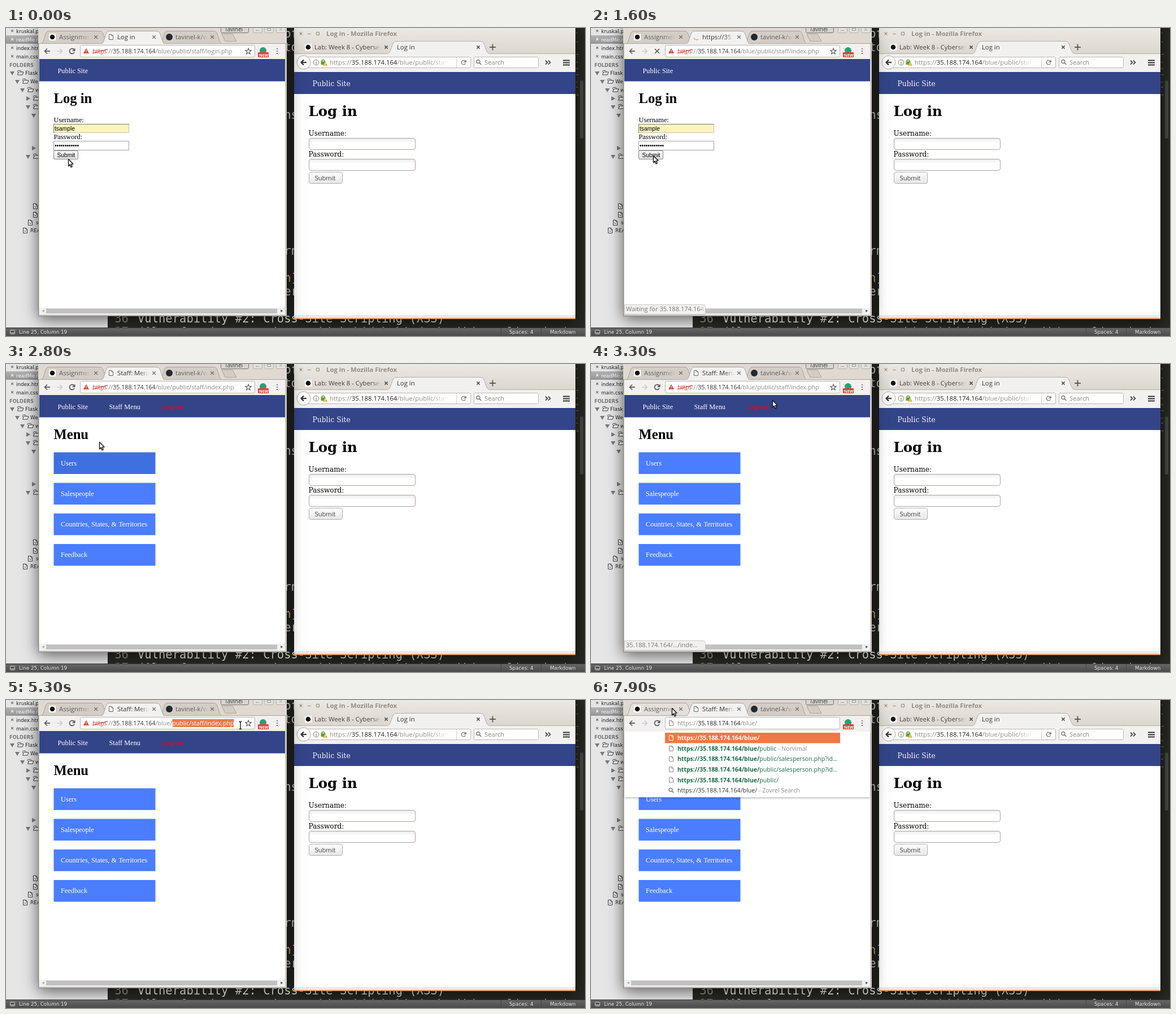
An HTML page with a canvas that plays this animation: 1025x546 px, repeating every 8000 ms.

```html
<!DOCTYPE html>
<html lang="en">
<head>
<meta charset="utf-8">
<title>Two browser sessions</title>
<style>
html, body { margin: 0; width: 100%; height: 100%; overflow: hidden; background: #272822; }
canvas { display: block; }
</style>
</head>
<body>
<canvas id="stage" width="1025" height="546"></canvas>
<script>
const ctx = document.getElementById('stage').getContext('2d');
const LOOP = 8000, STEP = 100;

const UI = '"Open Sans", sans-serif';
const SANS = '"DejaVu Sans", sans-serif';
const MONO = '"DejaVu Sans Mono", monospace';
const SERIF = '"Liberation Serif", serif';
const WIDE = '"DejaVu Serif", serif';
const ARIAL = '"Liberation Sans", sans-serif';

const NAVY = '#334488', CHROME = '#f2f1f0', ORANGE = '#f07746';
const HOST = '35.188.174.164';
const URL_SIZE = 10.65;

// Cursor keyframes: time, x, y
const PATH = [
  [0, 110, 232], [100, 112, 228], [200, 117, 218], [500, 117, 218], [600, 113, 222], [700, 110, 226],
  [2300, 110, 226], [2400, 138, 207], [2500, 150, 188], [2600, 155, 165], [2700, 155, 165],
  [2800, 165, 138], [3000, 215, 82], [3200, 292, 72], [3300, 321, 64], [3400, 335, 56], [3600, 322, 49],
  [4200, 295, 44], [4600, 295, 44], [5300, 415, 45], [7000, 415, 45], [7400, 336, 48], [7900, 143, 14]
];

const MENU = ['Users', 'Salespeople', 'Countries, States, & Territories', 'Feedback'];

function cursorAt(t) {
  let i = PATH.length - 1;
  while (i > 0 && PATH[i][0] > t) i--;
  const [t0, x0, y0] = PATH[i];
  const [t1, x1, y1] = PATH[i + 1] || [LOOP, x0, y0];
  const k = Math.max(0, (t - t0) / (t1 - t0));
  return { x: x0 + (x1 - x0) * k, y: y0 + (y1 - y0) * k };
}

const inside = (p, x, y, w, h) => p.x >= x && p.x < x + w && p.y >= y && p.y < y + h;

function rect(x, y, w, h, fill) {
  ctx.fillStyle = fill;
  ctx.fillRect(x, y, w, h);
}

function box(x, y, w, h, r, fill, stroke) {
  ctx.beginPath();
  ctx.roundRect(x, y, w, h, r);
  if (fill) { ctx.fillStyle = fill; ctx.fill(); }
  if (stroke) { ctx.strokeStyle = stroke; ctx.lineWidth = 1; ctx.stroke(); }
}

function poly(points, fill, stroke, width = 1, close = true) {
  ctx.beginPath();
  points.forEach(([x, y], i) => i ? ctx.lineTo(x, y) : ctx.moveTo(x, y));
  if (close) ctx.closePath();
  if (fill) { ctx.fillStyle = fill; ctx.fill(); }
  if (stroke) { ctx.strokeStyle = stroke; ctx.lineWidth = width; ctx.stroke(); }
}

const line = (points, color, width = 1) => poly(points, null, color, width, false);

function disc(x, y, r, fill, stroke, width = 1) {
  ctx.beginPath();
  ctx.arc(x, y, r, 0, 7);
  if (fill) { ctx.fillStyle = fill; ctx.fill(); }
  if (stroke) { ctx.strokeStyle = stroke; ctx.lineWidth = width; ctx.stroke(); }
}

function arc(x, y, r, from, to, color, width) {
  ctx.beginPath();
  ctx.arc(x, y, r, from, to);
  ctx.strokeStyle = color;
  ctx.lineWidth = width;
  ctx.stroke();
}

function vertical(y0, y1, top, bottom) {
  const g = ctx.createLinearGradient(0, y0, 0, y1);
  g.addColorStop(0, top);
  g.addColorStop(1, bottom);
  return g;
}

// Returns the x position after the text
function text(s, x, y, size, family, color, weight = '') {
  ctx.font = `${weight} ${size}px ${family}`;
  ctx.fillStyle = color;
  ctx.fillText(s, x, y);
  return x + ctx.measureText(s).width;
}

// Text that dissolves towards its right end
function fading(s, x, y, size, color, end, span = 22) {
  const g = ctx.createLinearGradient(end - span, 0, end, 0);
  g.addColorStop(0, color);
  g.addColorStop(1, color + '00');
  clipped(x, y - 16, end - x, 24, () => text(s, x, y, size, UI, g));
}

function clipped(x, y, w, h, draw) {
  ctx.save();
  ctx.beginPath();
  ctx.rect(x, y, w, h);
  ctx.clip();
  draw();
  ctx.restore();
}

function cross(x, y, r, color, width = 1.5) {
  line([[x - r, y - r], [x + r, y + r]], color, width);
  line([[x - r, y + r], [x + r, y - r]], color, width);
}

function page(x, y, color) {
  poly([[x - 3.5, y - 4.5], [x + 1, y - 4.5], [x + 3.5, y - 2], [x + 3.5, y + 4.5], [x - 3.5, y + 4.5]], '#fff', color);
  line([[x + 1, y - 4.5], [x + 1, y - 2], [x + 3.5, y - 2]], color);
}

function magnifier(x, y, color) {
  disc(x - 1, y - 1, 3, null, color, 1.3);
  line([[x + 1.2, y + 1.2], [x + 4.5, y + 4.5]], color, 1.6);
}

function reload(x, y, r, color, width) {
  arc(x, y, r, 0.4, 5.5, color, width);
  poly([[x + r + 1, y - r - 1], [x + r + 1, y], [x, y]], color);
}

function backArrow(x, y, dir, color, width) {
  line([[x + 5 * dir, y], [x - 4 * dir, y]], color, width);
  line([[x, y - 4.5], [x - 4.5 * dir, y], [x, y + 4.5]], color, width);
}

function warning(x, y, r, color) {
  poly([[x, y - r], [x + r, y + r * 0.8], [x - r, y + r * 0.8]], color);
  rect(x - 0.6, y - r * 0.4, 1.2, r * 0.6, '#fff');
  rect(x - 0.6, y + r * 0.4, 1.2, 1.2, '#fff');
}

function sidebar() {
  rect(0, 0, 180, 532, '#e6e6e6');
  rect(0, 13, 180, 15, vertical(13, 28, '#b3b3b3', '#959595'));
  ['kruskal.py', 'readMe.md', 'index.html', 'main.css'].forEach((name, i) => {
    const y = 5 + i * 15, on = i === 1;
    cross(11, y, 2, on ? '#eee' : '#777', 1.1);
    text(name, 18, y + 4, 8.8, SANS, on ? '#fff' : '#222');
  });
  text('FOLDERS', 6, 69, 8.3, SANS, '#777', 'bold');

  const folder = (x, y) => {
    box(x - 4.5, y - 3.5, 6, 3, 1, '#fff', '#333');
    poly([[x - 4.5, y + 4], [x - 2.5, y - 1], [x + 6, y - 1], [x + 4, y + 4]], '#fff', '#333');
  };
  const arrow = (x, y, open) => poly(open
    ? [[x - 4, y - 3], [x + 4, y - 3], [x, y + 4]]
    : [[x - 3, y - 4], [x + 4, y], [x - 3, y + 4]], '#777');
  const rows = [[11, 80, 1, 'Flask'], [20, 95, 1, 'Web'], [29, 110, 1, 'www'], [39, 125, 0, ''], [39, 140, 1, '']];
  rows.forEach(([x, y, open, name]) => {
    arrow(x, y, open);
    folder(x + 14, y - 1);
    text(name, x + 23, y + 3, 8.8, SANS, '#222');
  });
  arrow(49, 155, 1);
  arrow(49, 213, 0);
  arrow(39, 228, 1);
  folder(53, 227);
  [[52, 316], [52, 331], [43, 345], [34, 359]].forEach(([x, y]) => {
    page(x, y, '#333');
    line([[x - 2, y], [x, y + 2], [x + 2, y]], '#333');
  });
  text('s', 53, 348, 8.8, SANS, '#222');
  text('README', 43, 362, 8.8, SANS, '#222');
}

function editor() {
  rect(0, 0, 1025, 546, '#272822');
  // Rows count up from the heading near the bottom; columns share one grid
  const code = (s, row, col = 21, color = '#f0f0ea') =>
    text(s, 233 + col * 12.34, 522 - row * 24.05, 20.5, MONO, color);
  code('of', 21);
  code('to', 20);
  code('ns', 15);
  code('rn', 5);
  code('n', 3, 21, '#d8cf70');
  code(']', 3, 22);
  code('er', 2);
  ['Vulnerability #2: Cross-Site Scripting (XSS)',
   '(Also found a stored one which hid behind the Web application)'].forEach((s, i) => {
    code(String(36 + i), -i, -3.3, '#90908a');
    code(s, -i, 0);
  });
  [8, 24, 46, 60, 71, 82, 95, 104, 118].forEach((y, i) => rect(1009, y, 3 + i % 3, 1.5, '#5c5c56'));
  box(1016, 93, 6, 103, 3, '#484843');
  sidebar();
}

function statusBar() {
  rect(0, 531, 1025, 15, vertical(531, 546, '#686868', '#4b4b4b'));
  rect(0, 531, 1025, 1, '#333');
  box(7.5, 535.5, 8, 7, 1, null, '#ccc');
  rect(8, 540, 7, 1, '#ccc');
  text('Line 25, Column 19', 23, 542, 8.75, SANS, '#e4e4e4');
  text('Spaces: 4', 891, 542, 8.75, SANS, '#e4e4e4');
  text('Markdown', 963, 542, 8.75, SANS, '#e4e4e4');
  [876, 947].forEach(x => rect(x, 532, 1, 14, '#444'));
}

function shadowed(x, y, w, h, fill) {
  ctx.save();
  ctx.shadowColor = 'rgba(0,0,0,.6)';
  ctx.shadowBlur = 26;
  ctx.shadowOffsetY = 5;
  rect(x, y, w, h, fill);
  ctx.restore();
}

function tab(x, w, fill) {
  ctx.beginPath();
  ctx.moveTo(x, 28);
  ctx.bezierCurveTo(x + 6, 27, x + 6, 5.5, x + 13, 5.5);
  ctx.lineTo(x + w - 13, 5.5);
  ctx.bezierCurveTo(x + w - 6, 5.5, x + w - 6, 27, x + w, 28);
  ctx.fillStyle = fill;
  ctx.fill();
  ctx.strokeStyle = '#aaa39b';
  ctx.lineWidth = 1;
  ctx.stroke();
}

function leftTabs(t, state, pos) {
  rect(57, 0, 440, 28, '#dfd9d2');
  tab(272, 110, '#d3cdc6');
  tab(62, 118, inside(pos, 68, 6, 100, 22) ? '#e4dfda' : '#d3cdc6');
  line([[57, 27.5], [497, 27.5]], '#aaa39b');
  tab(169, 112, CHROME);
  rect(171, 27, 108, 2, CHROME);

  box(76, 10, 12, 12, 1, '#fff');
  disc(82, 16, 4.3, '#111');
  fading('Assignments', 94, 20, 11.3, '#5c5c5c', 150);
  disc(289, 16, 6, '#24292e');
  fading('tavinel-k/web', 300, 20, 11.3, '#5c5c5c', 357, 16);
  if (state.loading) {
    const a = t / 100 * 0.9 - 1;
    arc(187, 16, 5, a, a + 2, '#f0a468', 1.5);
  } else page(186, 16, '#666');
  const title = state.loading ? 'https://35.188' : state.menu ? 'Staff: Menu' : 'Log in';
  fading(title, 197, 20, 11.3, '#333333', 253, 16);
  [159, 262, 365].forEach(x => cross(x, 16, 2.8, '#77716b', 1.3));
  poly([[382, 10.5], [401, 10.5], [408, 23.5], [388, 23.5]], '#d3cdc6', '#aaa39b');

  [437.5, 457.5, 478.5].forEach(x => box(x, -4.5, 16, 13, 2, '#e5e0da', '#b5afa8'));
  rect(442, 4, 6, 1, '#999');
  box(462.5, 0.5, 6, 4, 0, null, '#999');
  cross(486.5, 2.5, 2.5, '#999', 1);
  box(380.5, -4.5, 49, 13, 2, '#d9d4cd', '#77726b');
  text('Tavinel', 387, 6, 10, UI, '#3c3b37');
}

function addressText(state, pos) {
  const dim = '#8b8b8b', y = 45;
  if (state.typed) {
    page(142, 41, '#888');
    let x = text('https://', 153, y, URL_SIZE, UI, dim);
    x = text(HOST, x, y, URL_SIZE, UI, '#222');
    x = text('/blue/', x, y, URL_SIZE, UI, dim);
    if (state.caret) rect(Math.round(x), 34, 1, 13, '#000');
    return;
  }
  warning(142, 41, 5, '#d23f31');
  let x = text('https', 153, y, URL_SIZE, UI, '#c5392c');
  line([[153, 45], [180, 37.5]], '#c5392c', 1.2);
  x = text('://', x, y, URL_SIZE, UI, dim);
  x = text(HOST, x, y, URL_SIZE, UI, '#333');
  x = text('/blue/', x, y, URL_SIZE, UI, dim);
  const tail = state.loading || state.menu ? 'public/staff/index.php' : 'public/staff/login.php';
  const end = text(tail, x, y, URL_SIZE, UI, dim);
  if (state.selecting) {
    const w = Math.min(pos.x, end) - x;
    if (w > 0) clipped(x, 34, w, 14, () => {
      rect(x, 34, w, 14, ORANGE);
      text(tail, x, y, URL_SIZE, UI, '#fff');
    });
  }
}

function leftToolbar(state, pos) {
  rect(59, 28, 435, 27, CHROME);
  backArrow(73, 41, 1, '#555', 1.7);
  backArrow(95, 41, -1, '#ccc', 1.7);
  if (state.loading) cross(117, 41, 4, '#555', 1.6);
  else reload(117, 41, 4.5, '#555', 1.7);
  box(131.5, 30.5, 309, 21, 2, '#fff', '#b9b4ae');
  addressText(state, pos);
  if (!state.typed) {
    const star = [...Array(10).keys()].map(i => {
      const a = i * Math.PI / 5 - Math.PI / 2, r = i % 2 ? 2.3 : 5.5;
      return [429 + r * Math.cos(a), 41.5 + r * Math.sin(a)];
    });
    poly(star, null, '#555', 1.1);
  }
  disc(455, 40, 6, '#1fa574');
  box(446, 43, 19, 9, 1, '#e2403a');
  text('NEW', 448, 50.5, 7, UI, '#fff', 'bold');
  [37, 41, 45].forEach(y => disc(480, y, 1.1, '#555'));
}

function loginPage() {
  text('Log in', 84.5, 133, 24.6, SERIF, '#000', 'bold');
  text('Username:', 84.5, 167, 12.3, SERIF, '#000');
  text('Password:', 84.5, 197, 12.3, SERIF, '#000');
  box(84.5, 170.5, 133, 15, 0, '#faf5bd', '#c4c1a8');
  line([[84.5, 186], [84.5, 170.5], [218, 170.5]], '#77776c');
  text('tsample', 86, 182, 10.25, ARIAL, '#000');
  box(84.5, 200.5, 133, 16, 0, '#fff', '#a0a0a0');
  text('•'.repeat(12), 86, 212, 10.25, ARIAL, '#000');
}

function submitButton(hover) {
  box(84.5, 217.5, 43, 15, 1.5, vertical(217, 233, hover ? '#f8f8f8' : '#f3f3f3', hover ? '#e2e2e2' : '#d9d9d9'), hover ? '#888' : '#a6a6a6');
  text('Submit', 90.5, 229, 10.25, ARIAL, '#000');
}

function menuPage(hoverPos) {
  text('Menu', 84.5, 133, 24.6, SERIF, '#000', 'bold');
  MENU.forEach((name, i) => {
    const y = 156.5 + i * 54.2;
    rect(84.5, y, 180, 38.5, inside(hoverPos, 85, y, 180, 38.5) ? '#3f70e0' : '#4a7dff');
    text(name, 97, y + 23.2, 12.3, SERIF, '#fff');
  });
}

function suggestions() {
  ctx.save();
  ctx.shadowColor = 'rgba(0,0,0,.3)';
  ctx.shadowBlur = 3;
  ctx.shadowOffsetY = 1;
  rect(59, 56, 435, 116.5, '#fff');
  ctx.restore();
  rect(59, 54, 435, 2, CHROME);
  rect(131, 58, 310, 18.5, ORANGE);
  const base = `https://${HOST}/blue/`, green = '#1a6b45', dim = '#8d8d8d';
  const rest = ['', 'public', 'public/salesperson.php?id…', 'public/salesperson.php?id…', 'public/', ''];
  rest.forEach((tail, i) => {
    const y = 67.3 + i * 18.55, last = i === 5;
    if (last) magnifier(142, y, '#777');
    else if (i) page(142, y, '#888');
    else {
      box(138.5, 62.5, 7, 9, 0.5, null, '#fff');
      line([[143, 63], [143, 65], [145, 65]], '#fff');
    }
    const color = last ? '#333' : i ? green : '#fff';
    let x = text(base, 153, y + 4, last ? URL_SIZE : 10.45, UI, color, last ? '' : 'bold');
    x = text(tail, x, y + 4, URL_SIZE, UI, color);
    if (i === 1) text(' - Norvimal', x, y + 4, URL_SIZE, UI, dim);
    if (last) text(' - Zovrel Search', x, y + 4, URL_SIZE, UI, dim);
  });
}

function bubble(message, alpha) {
  if (alpha <= 0) return;
  ctx.save();
  ctx.globalAlpha = alpha;
  box(59.5, 490.5, 143, 17, [0, 4, 0, 0], CHROME, '#cbc7c2');
  fading(message, 62, 502, 11.1, '#777777', 201, 8);
  ctx.restore();
}

function leftWindow(t, state, pos, hoverPos) {
  shadowed(57, -10, 440, 521, '#d0cac3');
  rect(57, 0, 1, 511, '#8e8880');
  rect(57, 510, 440, 1, '#8e8880');
  leftTabs(t, state, pos);
  rect(59, 55, 435, 453, '#fff');
  rect(59, 55, 435, 39.5, NAVY);
  text('Public Site', 91.5, 80, 12.3, SERIF, '#fff');
  if (state.menu) {
    text('Staff Menu', 182.5, 80, 12.3, SERIF, '#fff');
    text('Log out', 276.5, 80, 12.3, SERIF, '#f00');
    menuPage(hoverPos);
  } else {
    loginPage();
    submitButton(inside(hoverPos, 85, 217, 43, 16));
  }
  rect(59, 496, 435, 11.5, '#f1f1f1');
  rect(71, 497.5, 409, 8.5, '#c1c1c1');
  poly([[64, 501.5], [67.5, 499], [67.5, 504]], '#a3a3a3');
  poly([[490, 501.5], [486.5, 499], [486.5, 504]], '#444');
  leftToolbar(state, pos);
  if (state.typed) suggestions();
  bubble(`Waiting for ${HOST}...`, state.waiting);
  bubble(`${HOST}/…/inde…`, state.link);
}

function field(y) {
  box(536.5, y, 188, 20, 3.5, vertical(y, y + 8, '#ececec', '#ffffff'), '#aaa49d');
}

function rightWindow() {
  shadowed(510, -10, 498, 526, '#f2f1f0');
  rect(510, 0, 498, 46, vertical(0, 46, '#ece8e3', '#dcd6cf'));
  [522, 537, 552].forEach(x => disc(x, 10, 5, '#e6e1db'));
  cross(522, 10, 2.3, '#8f8a83', 1.1);
  rect(534.5, 10, 5, 1, '#8f8a83');
  box(549.5, 7.5, 5, 5, 0, null, '#8f8a83');
  text('Log in - Mozilla Firefox', 567, 14, 11.3, UI, '#928d86', 'bold');

  box(529, 28, 12, 12, 1, '#fff');
  disc(535, 34, 4.3, '#111');
  fading('Lab: Week 8 - Cybersecurity', 546, 38, 11.3, '#444444', 665, 18);
  cross(673, 34, 2.6, '#555', 1.6);
  line([[510, 45.5], [1008, 45.5]], '#b5afa8');
  ctx.beginPath();
  ctx.moveTo(674, 46);
  ctx.bezierCurveTo(684, 45, 681, 23.5, 691, 23.5);
  ctx.lineTo(840, 23.5);
  ctx.bezierCurveTo(850, 23.5, 847, 45, 857, 46);
  ctx.fillStyle = CHROME;
  ctx.fill();
  ctx.strokeStyle = '#b5afa8';
  ctx.lineWidth = 1;
  ctx.stroke();
  text('Log in', 692, 38, 11.3, UI, '#333');
  cross(836, 34, 2.6, '#555', 1.6);
  line([[856, 34], [867, 34]], '#555', 1.8);
  line([[861.5, 28.5], [861.5, 39.5]], '#555', 1.8);

  rect(510, 46, 498, 32, CHROME);
  box(530.5, 51.5, 292, 19, 2, '#fff', '#bcb7b0');
  disc(527, 61, 12, '#fafafa', '#b0aaa3');
  backArrow(527, 61, 1, '#333', 2.2);
  disc(549, 61, 4.8, null, '#777', 1);
  rect(548.4, 60, 1.2, 4, '#777');
  rect(548.4, 58, 1.2, 1.2, '#777');
  arc(561.5, 59, 2.6, Math.PI, 0, '#63a23c', 1.5);
  rect(557.5, 59, 8, 6, '#63a23c');
  warning(565, 63.5, 4, '#eea31f');
  let x = text('https://', 573, 65, 11.4, UI, '#8b8b8b');
  x = text(HOST, x, 65, 11.4, UI, '#222');
  fading('/blue/public/staff/login', x, 65, 11.4, '#8b8b8b', 784, 32);
  rect(797, 52, 1, 18, '#d5d1cc');
  reload(810, 61, 3.8, '#777', 1.3);
  box(828.5, 51.5, 114, 19, 2, '#fff', '#bcb7b0');
  magnifier(837, 60.5, '#777');
  text('Search', 847, 65, 11.2, UI, '#858585');
  [955, 960].forEach(cx => line([[cx, 57.5], [cx + 3.5, 61], [cx, 64.5]], '#333', 1.7));
  [56.5, 60.5, 64.5].forEach(y => rect(986, y, 12, 2, '#333'));

  rect(510, 78, 498, 431, '#fff');
  rect(510, 78, 498, 39, NAVY);
  text('Public Site', 542.5, 103, 12.3, WIDE, '#f4f4f8');
  text('Log in', 535.5, 156, 24.5, WIDE, '#000', 'bold');
  text('Username:', 535.5, 191, 12.2, WIDE, '#000');
  field(195.5);
  text('Password:', 535.5, 228, 12.2, WIDE, '#000');
  field(232.5);
  box(536.5, 255.5, 59, 20, 3.5, vertical(255, 276, '#fdfdfd', '#e8e6e4'), '#b3ada6');
  text('Submit', 546.5, 270, 11.2, UI, '#444');
  rect(510, 509, 498, 5, '#ebe9e7');
  rect(510, 514, 498, 2, '#dd9670');
}

function pointer(pos) {
  ctx.save();
  ctx.translate(Math.round(pos.x), Math.round(pos.y));
  if (inside(pos, 132, 31, 308, 21)) {
    const bars = (color, w) => {
      line([[0, -6], [0, 6]], color, w);
      line([[-2.5, -6.5], [2.5, -6.5]], color, w);
      line([[-2.5, 6.5], [2.5, 6.5]], color, w);
    };
    bars('#fff', 2.6);
    bars('#000', 1.3);
  } else {
    ctx.lineJoin = 'round';
    ctx.shadowColor = 'rgba(0,0,0,.35)';
    ctx.shadowBlur = 2;
    ctx.shadowOffsetY = 1;
    poly([[0.5, 0.5], [0.5, 12.5], [3.2, 10], [5.2, 14.6], [7.2, 13.6], [5.2, 9.2], [9, 9]], '#fff', '#111', 1.1);
  }
  ctx.restore();
}

function render(now) {
  const t = Math.floor(now % LOOP / STEP) * STEP;
  const pos = cursorAt(t);
  const hoverPos = cursorAt(Math.max(0, t - STEP));
  const during = (a, b) => t >= a && t < b;
  const state = {
    loading: during(1100, 1700),
    menu: t >= 1700,
    selecting: during(4700, 6100),
    typed: t >= 6100,
    caret: during(6100, 6600) || during(7100, 7600),
    waiting: during(1200, 2200) ? Math.min(1, (2200 - t) / 300) : 0,
    link: during(3000, 3600) ? Math.min(1, (t - 2900) / 200, (3600 - t) / 300) : 0
  };
  editor();
  rightWindow();
  leftWindow(t, state, pos, hoverPos);
  statusBar();
  pointer(pos);
}

const start = performance.now();
function tick() {
  render(performance.now() - start);
  requestAnimationFrame(tick);
}
tick();
</script>
</body>
</html>
```
